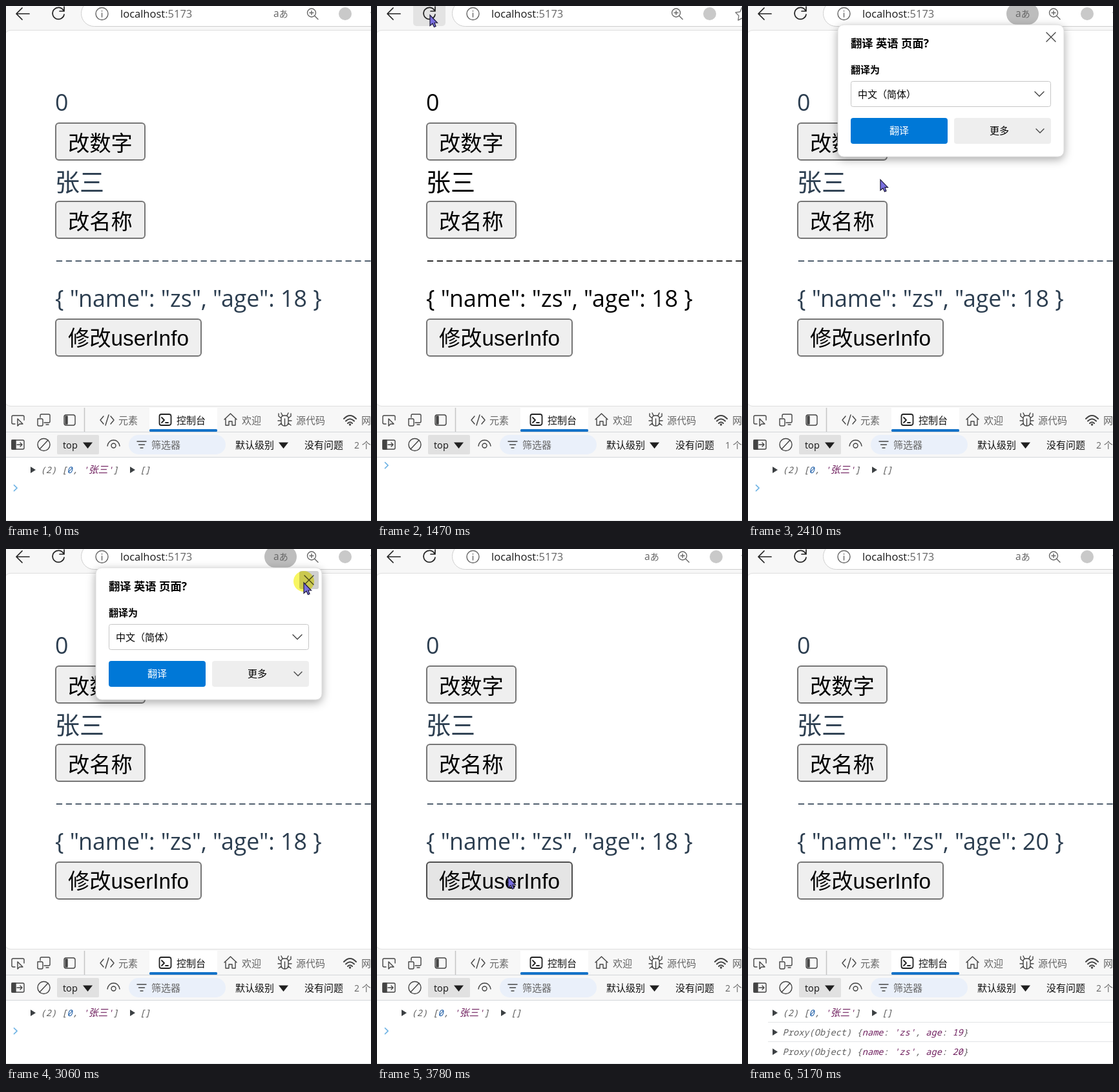
Write an HTML page that moves like this. It is 565 px wide and 796 px high and loops after 5.6 s.

```html
<!DOCTYPE html>
<html lang="zh-CN">
<head>
<meta charset="utf-8">
<title>localhost:5173</title>
<style>
html, body { margin: 0; width: 100%; height: 100%; overflow: hidden; background: #fff; }
svg { display: block; width: 565px; height: 796px; font: 15px "Open Sans", "Noto Sans CJK SC", "Noto Sans CJK", sans-serif; }
text { white-space: pre; }
.icon { fill: none; stroke: #444; stroke-width: 1.4; stroke-linejoin: round; stroke-linecap: round; }
.gray { fill: #666; }
.page { fill: #2c3e50; font-size: 35.7px; }
.dashes { font-size: 40px; font-weight: 300; letter-spacing: 2.05px; }
.button rect { fill: #efefef; stroke: #767676; stroke-width: 2; }
.button text { font: 33.3px "Liberation Sans", "Noto Sans CJK SC", "Noto Sans CJK", sans-serif; }
.bold { font-weight: bold; }
.log text { font: italic 13.7px "Noto Sans Mono", "Noto Sans CJK SC", monospace; fill: #606060; }
.log .num { fill: #1a5ba6; }
.log .str { fill: #70205f; }
.line { stroke: #e2e4e6; }
#popup { filter: drop-shadow(0 4px 7px #0005); }
#click { fill: #f8f54f; opacity: .9; mix-blend-mode: multiply; }
</style>
</head>
<body>
<svg viewBox="0 0 565 796">
  <defs>
    <path id="play" d="M0-5 8 0 0 5Z" fill="#3c4043"/>
    <path id="down" d="M0 0H15L7.5 9.5Z" fill="#1f1f1f"/>
  </defs>
  <rect width="565" height="796" fill="#f7f7f7"/>

  <!-- address bar -->
  <rect id="reloadHover" x="56" y="-5" width="50" height="36" rx="5" fill="#e3e3e3"/>
  <g class="icon" style="stroke:#222;stroke-width:1.7">
    <path d="M36 12H17M25 3 16 12 25 21"/>
    <path d="M89 7A9 9 0 1 0 90 13M90 1V8H83"/>
  </g>
  <rect x="116.5" y="-8.5" width="500" height="40" rx="20" fill="#fff" stroke="#cfcfcf"/>
  <g class="icon" style="stroke:#666">
    <circle cx="148.5" cy="12" r="9.5"/><path d="M148.5 11V17M148.5 7.5V8"/>
  </g>
  <text x="177" y="18" font-size="16.5" fill="#1a1a1a">localhost<tspan class="gray">:5173</tspan></text>
  <g id="translate">
    <rect id="translateHover" x="400" y="-5" width="50" height="34" rx="17" fill="#bdbdbd"/>
    <text x="414" y="17" class="gray" font-size="15.5">a<tspan font-size="14">あ</tspan></text>
  </g>
  <g id="tools">
    <path class="icon" style="stroke:#666" d="M479.5 10.5A6.5 6.5 0 1 1 466.5 10.5A6.5 6.5 0 1 1 479.5 10.5M478 15.5 483 20.5M470 10.5H476M473 7.5V13.5"/>
    <circle cx="525" cy="12" r="10" fill="#c9c9c9"/>
    <path class="icon" style="stroke:#777" d="M575 2 578 9 585 10 580 15 581 22 575 19 569 22 570 15 565 10 572 9Z"/>
  </g>

  <!-- page -->
  <rect x="-2" y="37.5" width="600" height="581" rx="9" fill="#fff" stroke="#dedede"/>
  <g id="content" class="page">
    <text x="76" y="162">0</text>
    <text x="76" y="285.5" font-size="38">张三</text>
    <text x="76" y="404.5" class="dashes">------------------------------------</text>
    <text id="info" x="76" y="465"></text>
  </g>
  <g class="button"><rect x="77" y="181" width="138" height="57" rx="5"/><text x="96" y="223.5">改数字</text></g>
  <g class="button"><rect x="77" y="302" width="138" height="57" rx="5"/><text x="96" y="345">改名称</text></g>
  <g class="button"><rect id="edit" x="77" y="484" width="225" height="57" rx="5"/><text x="96" y="525">修改userInfo</text></g>

  <!-- developer tools: tabs -->
  <rect x="222" y="621" width="105" height="37" fill="#fff"/>
  <path d="M0 658.5H565M0 697.5H565" stroke="#d3d6d9"/>
  <path d="M121.5 621V658" stroke="#c4c4c4" stroke-width="1.5"/>
  <rect x="222" y="654" width="105" height="4" rx="1.5" fill="#1473c8"/>
  <g class="icon">
    <path d="M14 646H11Q9 646 9 644V635Q9 633 11 633H26Q28 633 28 635V640M18 638V649L21 646H26Z"/>
    <path d="M53 636V633Q53 631 55 631H66Q68 631 68 633V642Q68 644 66 644H59M49 638H55Q57 638 57 640V647Q57 649 55 649H51Q49 649 49 647ZM62 647H66"/>
    <rect x="90" y="632" width="17" height="16" rx="3"/><path d="M92 634H95V646H92Z" fill="#444"/>
    <path d="M151 634 146 640 151 646M162 634 167 640 162 646M159 632 154 648"/>
    <path d="M338 639 347.5 630 357 639M340 638V648H345V642H350V648H355V638"/>
    <path d="M426 637Q426 633 431.5 633T437 637V643Q437 649 431.5 649T426 643ZM428 633 426 629M435 633 437 629M426 637 422 634V630M437 637 441 634V630M421 641H426M437 641H442M426 645 422 648M437 645 441 648M431.5 638V648"/>
    <path d="M523 638Q532.5 628 542 638M526 641.5Q532.5 635 539 641.5M529 645Q532.5 641.5 536 645" stroke-width="2"/>
    <circle cx="532.5" cy="647" r="1"/>
    <g style="stroke:#222;stroke-width:1.8"><rect x="237.5" y="631" width="18" height="17" rx="3"/><path d="M241 636 245 640 241 644M247 644H251"/></g>
  </g>
  <g class="gray">
    <text x="174" y="646">元素</text>
    <text x="264" y="646" fill="#111">控制台</text>
    <text x="365" y="646">欢迎</text>
    <text x="449" y="646">源代码</text>
    <text x="550" y="646">网络</text>
  </g>

  <!-- developer tools: filter bar -->
  <rect x="79" y="663" width="65" height="30" rx="2" fill="#e1e1e1"/>
  <rect x="190" y="663" width="150" height="30" rx="15" fill="#eaf0fa"/>
  <g class="icon">
    <rect x="9" y="671" width="19" height="14" rx="2"/><path d="M9 671H15V685H9Z" fill="#444"/><path d="M17 678H25M22 675 25 678 22 681"/>
    <circle cx="58.5" cy="678" r="9.5"/><path d="M52 685 65 671"/>
    <path d="M157 680Q159 671 166.5 671T176 680"/><circle cx="166.5" cy="679.5" r="3.5"/>
    <path d="M203 673H217M205.5 678H214.5M208 683H212"/>
  </g>
  <use href="#down" x="119" y="674.5"/><use href="#down" x="422" y="674.5"/>
  <g fill="#111">
    <text x="88" y="683.5" font-size="14.5">top</text>
    <text x="225" y="684" class="gray">筛选器</text>
    <text x="355" y="684">默认级别</text>
    <text x="462" y="684">没有问题</text>
    <text id="hidden" x="539" y="684" class="gray" font-size="14"></text>
  </g>

  <!-- console -->
  <rect y="698" width="565" height="98" fill="#fff"/>
  <g class="log">
    <g id="row1">
      <use href="#play" x="38" y="717"/>
      <text x="53.5" y="722">(2) [<tspan class="num">0</tspan>, <tspan class="str">'<tspan font-size="15">张三</tspan>'</tspan>]</text>
      <use href="#play" x="192" y="717"/><text x="207" y="722">[]</text>
    </g>
    <g id="row2"></g>
    <g id="row3"></g>
  </g>
  <path id="prompt" d="M-3-5 2 0-3 5" fill="none" stroke="#6cb2e4" stroke-width="1.7"/>
  <path class="line" d="M0 795.5H565"/>

  <!-- translation popup -->
  <g id="popup">
    <rect x="139" y="29" width="350" height="204" rx="9" fill="#fff" stroke="#ddd"/>
    <rect id="closeHover" x="454" y="34" width="30" height="28" rx="3" fill="#d0d0d0"/>
    <text x="159" y="64" class="bold" font-size="17.3">翻译 英语 页面?</text>
    <text x="159" y="104" class="bold">翻译为</text>
    <rect x="159.5" y="116.5" width="309" height="39" rx="3" fill="#fff" stroke="#c6c6c6"/>
    <text x="170" y="141.5">中文（简体）</text>
    <rect x="159" y="173" width="150" height="40" rx="4" fill="#0078d7"/>
    <rect x="319" y="173" width="150" height="40" rx="4" fill="#eee"/>
    <g text-anchor="middle"><text x="234" y="198" fill="#fff">翻译</text><text x="389" y="198">更多</text></g>
    <path class="icon" d="M462 41 476 55M476 41 462 55M444 132.5 451 139.5 458 132.5M446 190 452 196 458 190"/>
  </g>

  <circle id="click" r="16"/>
  <path id="arrow" d="M0 0V16.5L4 13 6.5 18.5 9 17.5 7 12H11.5Z" fill="#7a70e0" stroke="#1d1a3a" stroke-width="1.2"/>
  <path id="beam" d="M-5-8.5H5M-5 8.5H5M0-8V8" fill="none" stroke="#111" stroke-width="2.5"/>
</svg>
<script>
const LOOP = 5600;
const $ = id => document.getElementById(id);
const show = (id, on) => { $(id).style.opacity = on ? 1 : 0; };
const move = (id, x, y) => $(id).setAttribute('transform', `translate(${x} ${y})`);

// Pointer stops: time, x, y
const path = [
  [310, 206, 515], [500, 125, 300], [690, 30, 115], [830, 38, 42], [1000, 70, 20],
  [1150, 82, 14], [1520, 82, 14], [1840, 123, 157], [1900, 123, 157], [2080, 125, 175],
  [2330, 75, 410], [2560, 444, 8], [2660, 440, 40], [3060, 461, 52], [3120, 461, 52],
  [3190, 425, 190], [3260, 330, 350], [3330, 244, 460], [3400, 244, 460], [3480, 215, 498],
  [3780, 203, 507], [4840, 203, 507], [5170, 240, 800]
];

function pointer(t) {
  const i = path.findIndex(stop => stop[0] > t);
  if (i < 1) return null;
  const [t0, x0, y0] = path[i - 1], [t1, x1, y1] = path[i];
  const k = (t - t0) / (t1 - t0);
  return [x0 + (x1 - x0) * k, y0 + (y1 - y0) * k];
}

const proxyRow = (y, age) => `<path class="line" d="M31 ${y - 15.5}H565"/>
  <use href="#play" x="38" y="${y}"/>
  <text x="53.5" y="${y + 5}">Proxy(Object) {<tspan class="str">name</tspan>: <tspan class="str">'zs'</tspan>, <tspan class="str">age</tspan>: <tspan class="str">${age}</tspan>}</text>`;
$('row2').innerHTML = proxyRow(747, 19);
$('row3').innerHTML = proxyRow(777, 20);

function draw(t) {
  const within = (a, b) => t >= a && t < b;
  const reloading = within(1350, 1580);
  const age = 18 + (t >= 3920) + (t >= 4410);
  const rows = reloading ? 0 : age - 17;

  $('info').textContent = `{ "name": "zs", "age": ${age} }`;
  $('content').style.fill = reloading ? '#000' : '';
  $('hidden').textContent = `${reloading ? 1 : 2} 个`;
  for (let n = 1; n <= 3; n++) show('row' + n, rows >= n);
  move('prompt', 15, [710, 745, 775, 810][rows]);

  const bare = within(1470, 1580);
  show('translate', !bare);
  move('tools', bare ? -10 : 0, 0);
  show('reloadHover', within(1000, 2080));
  show('translateHover', within(1780, 3500));
  show('closeHover', within(2900, 3190));
  $('popup').style.opacity = within(1780, 3120) ? 1 : within(3120, 3190) ? 0.5 : 0;

  const pressed = within(3850, 3920) || within(4340, 4460);
  const over = within(3480, 4890);
  $('edit').style.fill = pressed ? '#f5f5f5' : over ? '#e5e5e5' : '';
  $('edit').style.stroke = pressed ? '#8d8d8d' : over ? '#4f4f4f' : '';

  const at = pointer(t);
  const overText = within(3290, 3420);
  show('arrow', at && !overText);
  show('beam', at && overText);
  $('click').style.visibility = pressed || within(1280, 1400) || within(3060, 3120) ? 'visible' : 'hidden';
  if (at) {
    move('arrow', ...at);
    move('beam', ...at);
    move('click', at[0], at[1] - 2);
  }
}

function tick() {
  draw(performance.now() % LOOP);
  requestAnimationFrame(tick);
}
tick();
</script>
</body>
</html>
```
